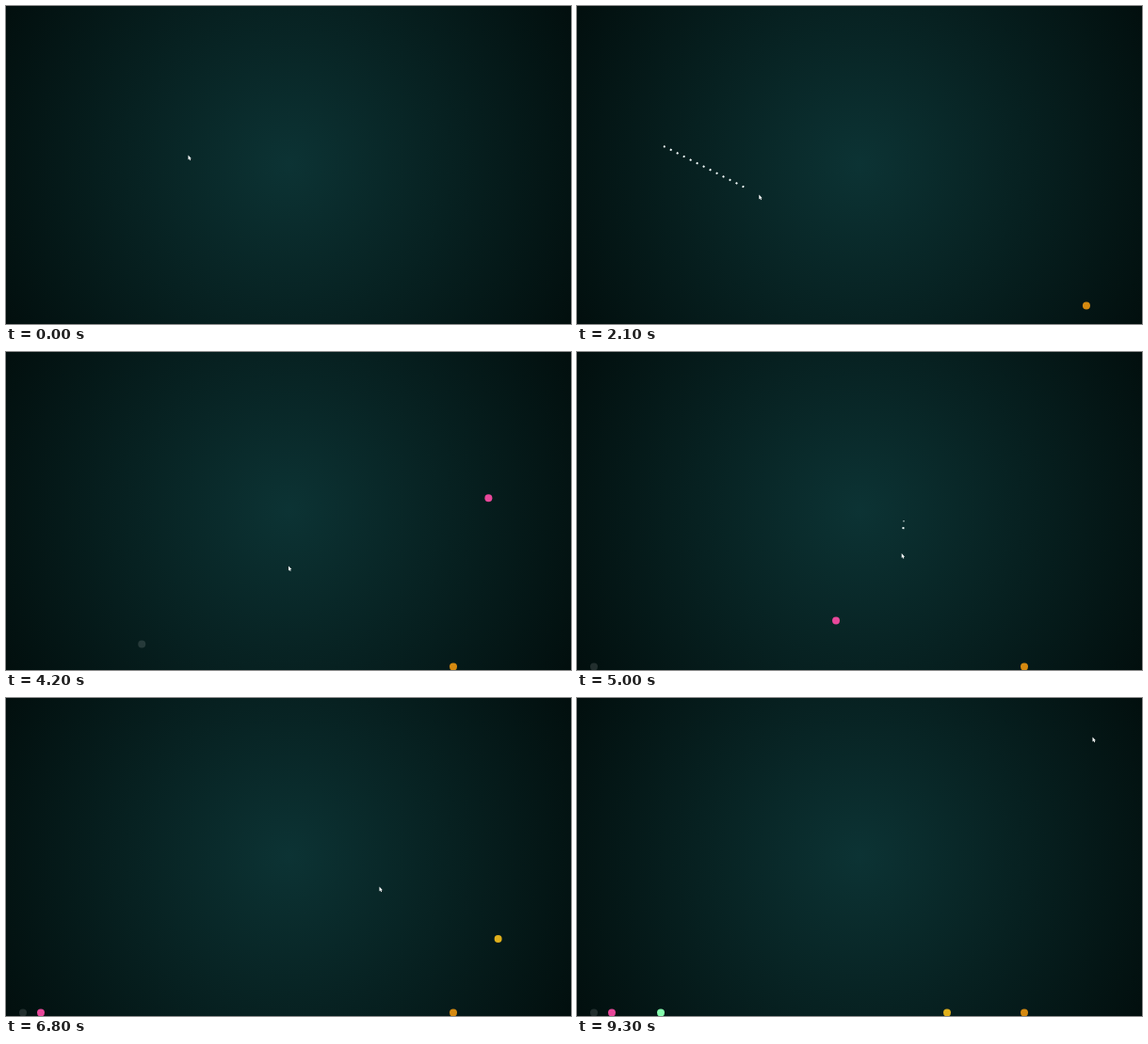
These frames come from a looping animation (600 by 338 pixels, 9.4 s). An HTML page with a canvas:

```html
<!DOCTYPE html>
<html lang="en">
<head>
<meta charset="utf-8">
<title>Slingshot balls</title>
<style>
  html, body { margin: 0; width: 100%; height: 100%; overflow: hidden; background: #020f0e; }
  canvas {
    display: block;
    background: radial-gradient(circle 344px at 300px 168px, #0c3334, #020f0e);
  }
</style>
</head>
<body>
<canvas id="stage" width="600" height="338"></canvas>
<script>
const WIDTH = 600, HEIGHT = 338, LOOP = 9.4, STEP = 0.1;
const RADIUS = 4, LEFT = RADIUS, RIGHT = WIDTH - RADIUS, TOP = RADIUS, FLOOR = 334.5;
const GRAVITY = 700;  // px per second squared
const REBOUND = 0.8;  // speed kept at walls and ceiling
const HOP = 0.45;     // upward speed kept at the floor
const SLIDE = 0.27;   // share of the way to rest left after each hop
const LAG = 0.06;     // the dotted line trails the pointer

const ctx = document.getElementById('stage').getContext('2d');

// Each shot is dragged from press to launch, then flies off with velocity v.
// rest lies beyond a wall when the ball rebounds on its way there.
const shots = [
  { color: '#d68a10', press: { t: 0.3, x: 196, y: 161 },
    launch: { t: 0.885, x: 157, y: 198 }, v: [316, -326], rest: 2 * RIGHT - 475 },
  { color: 'rgba(255,255,255,.13)', press: { t: 1.72, x: 92, y: 149 },
    launch: { t: 2.2, x: 204, y: 206 }, v: [-963, -386], rest: 18 },
  { color: '#e8489a', press: { t: 3.4, x: 336.5, y: 208.5 },
    launch: { t: 3.8, x: 270, y: 258 }, v: [606, -397], rest: 37 },
  { color: '#e0b01c', press: { t: 4.92, x: 347, y: 179.5 },
    launch: { t: 5.19, x: 341, y: 270 }, v: [224, -707], rest: 393 },
  { color: '#86fcae', press: { t: 6.75, x: 389, y: 200 },
    launch: { t: 7.15, x: 440, y: 203 }, v: [-431, 5], rest: 2 * LEFT - 89 }
];

// The pointer visits every press and launch, with a few stops between.
const stops = [
  { t: 0.1, x: 193.5, y: 158.5 }, { t: 0.2, x: 196, y: 161 },
  { t: 5.9, x: 312, y: 252 }, { t: 7.7, x: 348.5, y: 237 }, { t: 9.3, x: 547.5, y: 41.5 },
  ...shots.flatMap(({ press, launch }) => [press, { ...launch, t: launch.t - LAG }])
].sort((a, b) => a.t - b.t);

function pointerAt(t) {
  const i = stops.findIndex(stop => stop.t > t);
  if (i < 0) return stops[stops.length - 1];
  if (i === 0) return stops[0];
  const a = stops[i - 1], b = stops[i], k = (t - a.t) / (b.t - a.t);
  return { x: a.x + (b.x - a.x) * k, y: a.y + (b.y - a.y) * k };
}

// Mirrors a coordinate at the side walls.
const fold = x => x > RIGHT ? 2 * RIGHT - x : x < LEFT ? 2 * LEFT - x : x;

function ballAt({ launch, v, rest }, t) {
  let { x, y } = launch, [vx, vy] = v, left = t - launch.t;

  // free flight up to the first landing
  while (left > 0 && y < FLOOR) {
    const dt = Math.min(0.001, left);
    x += vx * dt;
    y += vy * dt + GRAVITY * dt * dt / 2;
    vy += GRAVITY * dt;
    if (x < LEFT || x > RIGHT) { x = fold(x); vx *= -REBOUND; }
    if (y < TOP) { y = 2 * TOP - y; vy *= -REBOUND; }
    left -= dt;
  }
  if (y < FLOOR) return { x, y };

  // shrinking hops towards the resting place
  let gap = x - rest, hop = 2 * vy * HOP / GRAVITY;
  while (left > hop && hop > 0.01) {
    left -= hop;
    gap *= SLIDE;
    hop *= HOP;
  }
  if (hop <= 0.01) return { x: fold(rest), y: FLOOR };
  gap *= 1 - (1 - SLIDE) * left / hop;
  return { x: fold(rest + gap), y: FLOOR - GRAVITY / 2 * left * (hop - left) };
}

function drawAim(from, to) {
  ctx.setLineDash([2, 5.83]);
  ctx.lineWidth = 2;
  ctx.strokeStyle = '#f2fafa';
  ctx.beginPath();
  ctx.moveTo(from.x, from.y);
  ctx.lineTo(to.x, to.y);
  ctx.stroke();
}

function drawBall(color, { x, y }) {
  ctx.fillStyle = color;
  ctx.beginPath();
  ctx.arc(x, y, RADIUS, 0, Math.PI * 2);
  ctx.fill();
}

const arrow = new Path2D('M0 0V5L1.1 4 1.8 5.7 2.6 5.3 2 3.7H3.4Z');

function drawPointer({ x, y }) {
  ctx.save();
  ctx.translate(x, y);
  ctx.fillStyle = '#fff';
  ctx.fill(arrow);
  ctx.restore();
}

function draw(t) {
  ctx.clearRect(0, 0, WIDTH, HEIGHT);
  for (const shot of shots) {
    if (t >= shot.launch.t) drawBall(shot.color, ballAt(shot, t));
    else if (t - LAG > shot.press.t) drawAim(pointerAt(t - LAG), shot.press);
  }
  drawPointer(pointerAt(t));
}

// The picture advances ten times a second.
function tick() {
  const t = performance.now() / 1000 % LOOP;
  draw(Math.floor(t / STEP + 1e-4) * STEP);
  requestAnimationFrame(tick);
}
tick();
</script>
</body>
</html>
```
